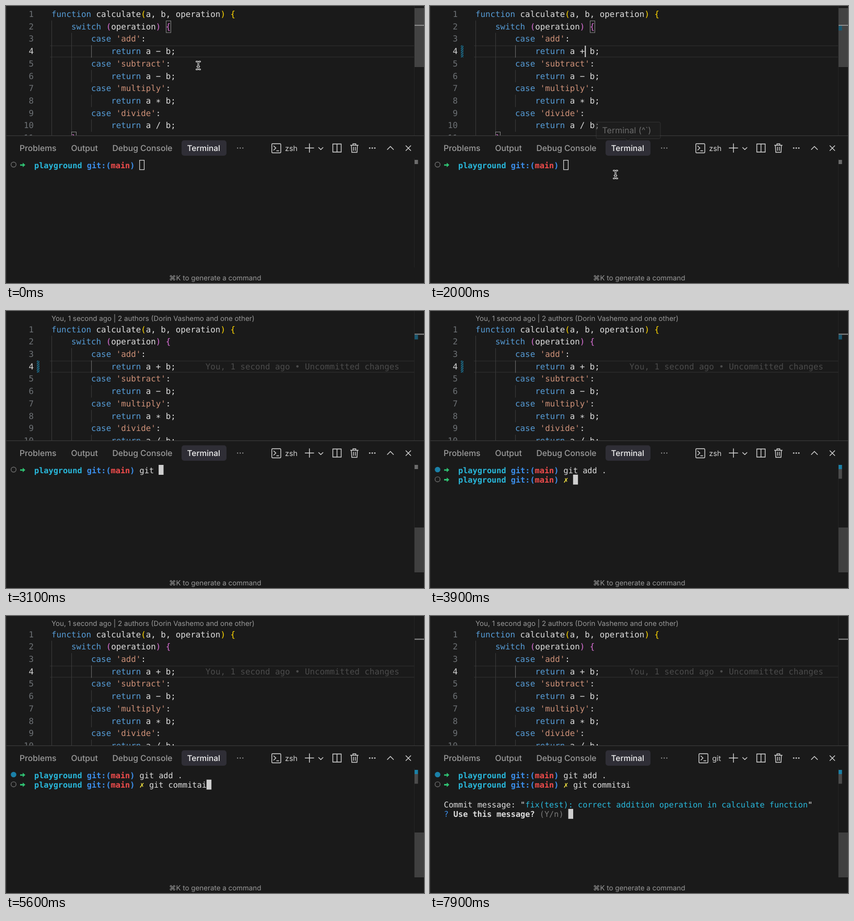
These frames come from a looping animation (800x531 px, 8000 ms). An HTML page:

```html
<!DOCTYPE html>
<html lang="en">
<head>
<meta charset="utf-8">
<title>Editor and terminal</title>
<style>
html, body { margin: 0; width: 100%; height: 100%; overflow: hidden; background: #1a1a1a; }
svg { display: block; width: 800px; height: 531px; }
text { white-space: pre; text-rendering: geometricPrecision; }
.code { font: 15.8px "DejaVu Sans Mono", monospace; }
.term { font: 15.22px "DejaVu Sans Mono", monospace; }
.ui { font-family: Inter, "Noto Sans", sans-serif; }
.icon { fill: none; stroke: #d4d4d4; stroke-width: 1.4; }
</style>
</head>
<body>
<svg id="stage" viewBox="0 0 800 531">
  <defs>
    <clipPath id="editorClip"><rect width="800" height="248"/></clipPath>
    <pattern id="hatch" width="3" height="3" patternUnits="userSpaceOnUse" patternTransform="rotate(-45)">
      <rect width="3" height="1.5" fill="#1b81a8"/>
    </pattern>
  </defs>
</svg>
<script>
const LOOP = 8000, STEP = 100;
const CODE_X = 87, CODE_W = 9.512, LINE = 23.72;
const TERM_X = 26.5, TERM_W = 9.163, ROW = 18.7;
const COLORS = {
  k: '#569cd6', t: '#dedede', s: '#ce9178', y: '#ffd700', m: '#da70d6', dim: '#858585',
  blame: '#4b4b4b', cyan: '#29b8db', blue: '#3b8eea', red: '#f14c4c', gold: '#f5e543', gray: '#7a7a7a'
};
const stage = document.getElementById('stage');
const timed = [];

function add(parent, tag, attrs, content) {
  const node = document.createElementNS('http://www.w3.org/2000/svg', tag);
  for (const key in attrs) node.setAttribute(key, attrs[key]);
  if (content !== undefined) node.textContent = content;
  parent.appendChild(node);
  return node;
}
const group = (parent, attrs = {}) => add(parent, 'g', attrs);
const rect = (parent, x, y, width, height, fill, more) =>
  add(parent, 'rect', { x, y, width, height, fill, ...more });
const path = (parent, d, attrs) => add(parent, 'path', { d, ...attrs });
const ui = (parent, x, y, size, fill, content, weight = 400) =>
  add(parent, 'text', { x, y, fill, class: 'ui', 'font-size': size, 'font-weight': weight }, content);
const move = (node, x, y) => node.setAttribute('transform', `translate(${x} ${y})`);
const clamp = (v, lo, hi) => Math.max(lo, Math.min(hi, v));

// Shows a node only inside the given [from, to) spans.
function during(node, ...spans) {
  timed.push([node, spans]);
  return node;
}

// Lays out coloured runs on a monospace grid.
function runs(parent, cls, x, y, width, parts) {
  const line = add(parent, 'text', { class: cls, y });
  let col = 0;
  for (const [color, content, weight] of parts) {
    add(line, 'tspan', { x: x + col * width, fill: COLORS[color], 'font-weight': weight || 400 }, content);
    col += content.length;
  }
  return line;
}
const codeY = i => 21 + i * LINE;
const code = (i, col, parts) => runs(lines, 'code', CODE_X + col * CODE_W, codeY(i), CODE_W, parts);
const term = (parent, row, col, parts) =>
  runs(parent, 'term', TERM_X + col * TERM_W, 310.5 + row * ROW, TERM_W, parts);

// Editor
const editor = group(stage, { 'clip-path': 'url(#editorClip)' });
const lens = ui(editor, 87, 19, 13.4, '#999', 'You, 1 second ago | 2 authors (Dorin Vashemo and one other)');
during(lens, [2300, LOOP]);
const lines = group(editor);

rect(lines, 84, 75.5, 698, 1.6, '#292929');
rect(lines, 84, 97, 698, 1.6, '#292929');
const guide = (col, from, to, fill = '#3c3c3c') =>
  rect(lines, CODE_X + col * CODE_W, 4 + from * LINE, 1, (to - from) * LINE, fill);
guide(0, 1, 11);
guide(4, 2, 10);
[5, 7, 9].forEach(i => guide(8, i, i + 1));
guide(8, 3, 4, '#707070');

for (let i = 0; i < 11; i++) {
  add(lines, 'text', {
    class: 'code', x: 53, y: codeY(i), 'text-anchor': 'end', fill: i === 3 ? '#d4d4d4' : '#6e7276'
  }, i + 1);
}
code(0, 0, [['k', 'function'], ['t', ' calculate'], ['y', '('], ['t', 'a, b, operation'], ['y', ')'], ['t', ' '], ['y', '{']]);
code(1, 4, [['k', 'switch'], ['t', ' '], ['m', '('], ['t', 'operation'], ['m', ')'], ['t', ' '], ['m', '{']]);
['add', 'subtract', 'multiply', 'divide'].forEach((name, i) =>
  code(2 + i * 2, 8, [['k', 'case '], ['s', `'${name}'`], ['t', ':']]));
const result = (i, op) => code(i, 12, [['k', 'return'], ['t', ` a ${op} b;`]]);
during(result(3, '\u2212'), [0, 200]);
during(code(3, 12, [['k', 'return'], ['t', ' a  '], ['dim', 'b;']]), [200, 1000]);
during(result(3, '+'), [1000, LOOP]);
result(5, '\u2212');
result(7, '\u2217');
result(9, '/');
code(10, 4, [['m', '}']]);
during(code(3, 31, [['blame', 'You, 1 second ago \u2022 Uncommitted changes']]), [2300, LOOP]);

const brackets = during(group(lines, { fill: 'none', stroke: '#888' }), [0, 2200]);
rect(brackets, 306.5, 28.5, 9, 22.5, 'none');
rect(brackets, 125.5, 241.5, 9, 22.5, 'none');
during(rect(lines, 59, 75.5, 5, 23, 'url(#hatch)'), [400, 4600]);
during(path(lines, 'M296 97 l3 -3 l3 3 l3 -3 l2 2', { fill: 'none', stroke: '#f14c4c', 'stroke-width': 1.4 }), [600, 1300]);
const caret = (col, ...spans) => during(rect(lines, CODE_X + col * CODE_W, 76, 2, 22, '#d4d4d4'), ...spans);
caret(21, [200, 700]);
caret(22, [1000, 1500], [2000, 2200]);

// Editor overview ruler
rect(stage, 781, 0, 1, 248, '#252525');
const slider = rect(stage, 782, 4, 18, 113, '#434343');
const ruler = group(stage);
rect(ruler, 782, 36, 18, 2, '#8c8c8c');
during(rect(ruler, 782, 38, 6.5, 9, '#1b5870'), [400, 4600]);
during(rect(ruler, 793, 38, 7, 9, '#a33a3a'), [600, 1300]);

// Panel header
rect(stage, 0, 248, 800, 1.2, '#3a3a3a');
rect(stage, 0, 0, 1, 531, '#2a2a2a');
ui(stage, 26, 277.5, 15.7, '#9c9c9c', 'Problems', 500);
const badge = during(group(stage), [600, 1300]);
add(badge, 'circle', { cx: 123, cy: 272, r: 12, fill: '#454545' });
add(badge, 'text', { class: 'ui', x: 123, y: 276.7, 'font-size': 13, fill: '#eee', 'text-anchor': 'middle' }, '1');

const dots = (parent, x, gap, r, fill) =>
  [-1, 0, 1].forEach(i => add(parent, 'circle', { cx: x + i * gap, cy: 272.3, r, fill }));
const tabs = group(stage);
ui(tabs, 124.5, 277.5, 15.7, '#9c9c9c', 'Output', 500);
ui(tabs, 203.5, 277.5, 15.7, '#9c9c9c', 'Debug Console', 500);
rect(tabs, 336, 257.5, 86, 29.5, '#2f2e36', { rx: 5 });
ui(tabs, 346.5, 277.5, 15.4, '#f2f2f2', 'Terminal', 500);
dots(tabs, 448.3, 5, 1.1, '#aaa');

const tools = group(stage);
const shell = group(tools);
rect(shell, 508.7, 264, 17.2, 17.5, 'none', { class: 'icon', rx: 1.5 });
path(shell, 'M512 268 l4.5 4.3 l-4.5 4.3 M517.5 277.5 h5', { class: 'icon' });
const shellName = ui(shell, 534, 277.8, 14.3, '#cfcfcf', 'zsh');
[
  'M572 272.3 h17.5 M580.7 263.5 v17.5',
  'M598 271 l4.5 4.3 l4.5 -4.3',
  'M625.5 264.5 h16 v15.5 h-16 z M633.5 264.5 v15.5',
  'M659 267 h15.5 M664 267 v-2.7 h5.5 v2.7 M661 267 l.8 13.5 h10 l.8 -13.5 M665 270 v7.5 M668.6 270 v7.5',
  'M729.5 275.5 l6.2 -6.2 l6.2 6.2',
  'M765 267.5 l10 10 M775 267.5 l-10 10'
].forEach(d => path(tools, d, { class: 'icon' }));
dots(tools, 701, 4.9, 1.4, '#ccc');

// Terminal
rect(stage, 781, 292, 1, 209, '#252525');
during(rect(stage, 782, 415, 18, 86, '#404040'), [2200, LOOP]);
during(rect(stage, 782, 295, 6.5, 8, '#6c6c6c'), [0, 3700]);
const ranMark = during(group(stage), [3700, LOOP]);
rect(ranMark, 782, 295, 6.5, 8, '#1b81a8');
rect(ranMark, 782, 303, 6.5, 18.5, '#4c4c4c');

function prompt(row, tail = []) {
  const g = group(stage), y = row * ROW;
  path(g, `M27 ${303.4 + y} h5 v-2.8 l5 4.2 l-5 4.2 v-2.8 h-5 z`, { fill: '#2fbf71' });
  term(g, row, 3, [['cyan', 'playground', 700], ['t', ' '], ['blue', 'git:(', 700], ['red', 'main', 700], ['blue', ')', 700], ['t', ' '], ...tail]);
  return g;
}
const circle = (parent, row, attrs) => add(parent, 'circle', { cx: 14.5, cy: 304 + row * ROW, r: 4.8, ...attrs });
const idle = { fill: 'none', stroke: '#6c6c6c', 'stroke-width': 1.4 };
prompt(0);
during(circle(stage, 0, idle), [0, 3700]);
during(circle(stage, 0, { fill: '#1b81a8', r: 5.3 }), [3700, LOOP]);
const second = during(prompt(1, [['gold', '\u2717', 700]]), [3700, LOOP]);
circle(second, 1, idle);

const typed = [
  { row: 0, col: 25, start: 2700, content: 'git add .' },
  { row: 1, col: 27, start: 4200, content: 'git commitai' }
];
for (const entry of typed) entry.node = term(stage, entry.row, entry.col, [['t', '']]).firstChild;

const answer = during(group(stage), [7500, LOOP]);
term(answer, 3, 0, [['t', 'Commit message: "'], ['cyan', 'fix(test): correct addition operation in calculate function'], ['t', '"']]);
term(answer, 4, 0, [['blue', '? '], ['t', 'Use this message?', 700], ['gray', ' (Y/n)']]);

during(rect(stage, 255.7, 295.7, 8.8, 18, 'none', { stroke: '#ddd', 'stroke-width': 1.2 }), [0, 2200]);
const block = during(rect(stage, 0, 0, 9.4, 19, '#cfcfcf'), [2200, LOOP]);

ui(stage, 312, 526.3, 13.4, '#999', '\u2318K to generate a command');

// Tooltip and pointer
const tip = group(stage);
path(tip, 'M321 222.5 h117 q3 0 3 3 v26 q0 3 -3 3 h-54 l-5 4.5 l-5 -4.5 h-53 q-3 0 -3 -3 v-26 q0 -3 3 -3 z',
  { fill: '#202020', stroke: '#4a4a4a' });
ui(tip, 329.5, 244, 16, '#bbb', 'Terminal (^`)');

const pointer = during(group(stage, { fill: 'none', 'stroke-linecap': 'round' }), [0, 200], [1300, 2800]);
const beam = 'M-3.5 -7.5 Q0 -7.5 0 -5 V5 Q0 7.5 -3.5 7.5 M3.5 -7.5 Q0 -7.5 0 -5 M3.5 7.5 Q0 7.5 0 5 M-1.8 2 H1.8';
path(pointer, beam, { stroke: '#eee', 'stroke-width': 3 });
path(pointer, beam, { stroke: '#111', 'stroke-width': 1 });

const pointerPath = [
  [1300, 368, 114], [1600, 374, 262], [1700, 374, 270], [1800, 368, 285],
  [2000, 355, 323], [2200, 345, 344], [2300, 341, 352]
];
const tipFade = [[1700, 0], [1800, 0.5], [1900, 0.9], [2000, 0.5], [2100, 0]];
const sliderFade = [[2500, 1], [2800, 0]];

// Linear interpolation over rows of [time, ...values].
function at(table, t) {
  const next = table.findIndex(row => row[0] > t);
  if (next === 0) return table[0].slice(1);
  if (next < 0) return table[table.length - 1].slice(1);
  const a = table[next - 1], b = table[next], f = (t - a[0]) / (b[0] - a[0]);
  return a.slice(1).map((v, i) => v + (b[i + 1] - v) * f);
}

function cursorCell(t, counts) {
  if (t < 3700) return [25 + counts[0], 0];
  if (t < 6000) return [27 + counts[1], 1];
  return t < 7500 ? [0, 2] : [26, 4];
}

function draw(t) {
  for (const [node, spans] of timed) {
    node.style.display = spans.some(([from, to]) => t >= from && t < to) ? '' : 'none';
  }
  const lensOn = t >= 2300, badgeOn = t >= 600 && t < 1300, running = t >= 6200;
  move(lines, 0, lensOn ? 19.6 : 0);
  move(ruler, 0, lensOn ? 7.5 : 0);
  slider.setAttribute('height', lensOn ? 108 : 113);
  slider.setAttribute('opacity', at(sliderFade, t)[0]);
  move(tabs, badgeOn ? 34 : 0, 0);
  move(tools, badgeOn ? 10 : 0, 0);
  move(shell, running ? 6 : 0, 0);
  shellName.textContent = running ? 'git' : 'zsh';

  const counts = typed.map(({ node, start, content }) => {
    const n = clamp(Math.floor((t - start) / STEP), 0, content.length);
    node.textContent = content.slice(0, n);
    return n;
  });
  const [col, row] = cursorCell(t, counts);
  move(block, TERM_X + col * TERM_W - 0.1, 295 + row * ROW);
  move(pointer, ...at(pointerPath, t));
  tip.setAttribute('opacity', at(tipFade, t)[0]);
}

const begin = performance.now();
function tick() {
  const t = (performance.now() - begin) % LOOP;
  draw(Math.floor(t / STEP) * STEP);
  requestAnimationFrame(tick);
}
tick();
</script>
</body>
</html>
```
